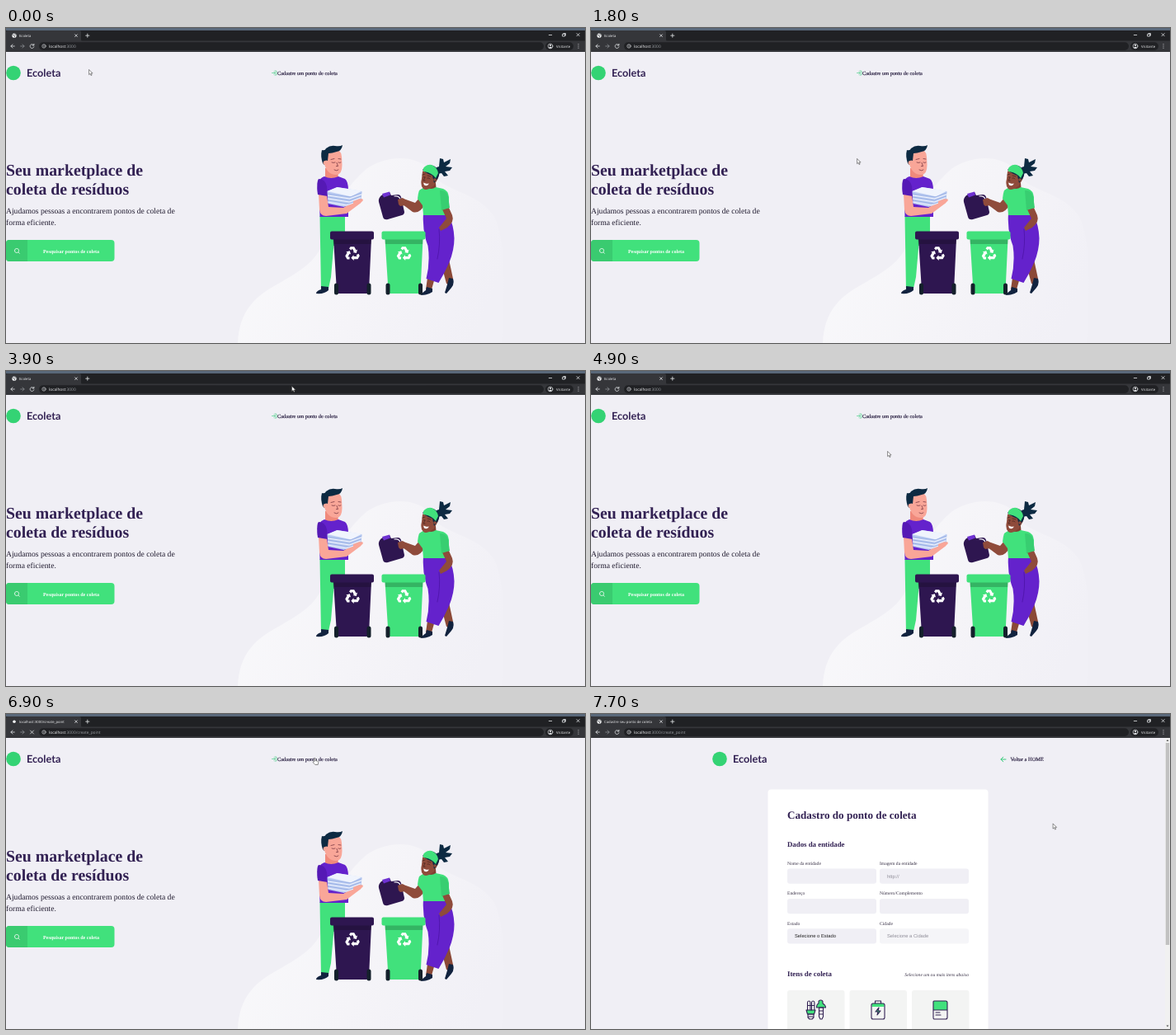
These frames come from a looping animation (702 px wide and 382 px high, 8 s). An HTML page:

```html
<!DOCTYPE html>
<html lang="pt-BR">
<head>
<meta charset="utf-8">
<title>Ecoleta</title>
<style>
html, body { margin: 0; width: 100%; height: 100%; overflow: hidden; background: #f0eff5; }
svg { display: block; }
text { text-rendering: geometricPrecision; font-family: "Liberation Serif", Times, serif; fill: #322153; }
.ui text { font-family: "Open Sans", "Noto Sans", sans-serif; fill: #f1f2f4; font-size: 4.25px; font-weight: 500; }
.ui .url { font-size: 4.85px; }
.ui .dim { fill: #989ca1; }
.brand { font: 700 12.7px Lato, "Noto Sans", sans-serif; }
.line { fill: none; stroke-linecap: round; stroke-linejoin: round; }
.h { font-weight: 700; }
.lead { fill: #1f1a2e; }
.link { font-size: 6.4px; fill: #1f1538; stroke: #1f1538; stroke-width: .15px; }
.label { font-size: 5.63px; fill: #3a3348; }
.field { font: 5.8px "Liberation Sans", Arial, sans-serif; fill: #222; }
.off { fill: #8f8d98; }
</style>
</head>
<body>
<svg width="702" height="382" viewBox="0 0 702 382">
  <defs>
    <linearGradient id="fade" x1="0" y1=".3" x2="1" y2=".6">
      <stop offset="0" stop-color="#f9f9fb"/>
      <stop offset=".55" stop-color="#f5f4f8"/>
      <stop offset="1" stop-color="#f1f0f6"/>
    </linearGradient>
    <path id="arm" d="M-3.6-5.8L-2.2-8H2L4.2-4.2 5.5-5 4.4-.8 .4-1.8 1.7-2.6-.2-5.8-1.2-4.2Z"/>
    <g id="cycle">
      <use href="#arm"/><use href="#arm" transform="rotate(120)"/><use href="#arm" transform="rotate(240)"/>
    </g>
    <g id="logo">
      <circle cx="9" cy="54.5" r="8.8" fill="#34d374"/>
      <text class="brand" x="25" y="59">Ecoleta</text>
    </g>
    <g id="bin">
      <path d="M4 9h46l-3 64q0 3-3 3H11q-3 0-3-3z"/>
      <path d="M4 10h46l-.3 6H4.300z" fill="#000" opacity=".2"/>
      <path d="M2 .5h49q2 0 2 2v6q0 2-2 2H2q-2 0-2-2v-6q0-2 2-2z"/>
      <g fill="#14202b">
        <rect x="5" y="63.500" width="5" height="14" rx="2.500"/>
        <rect x="44.500" y="63.500" width="5" height="14" rx="2.500"/>
      </g>
      <use href="#cycle" transform="translate(27 28) scale(1.100)" fill="#fff"/>
    </g>
  </defs>

  <g id="home">
    <path fill="url(#fade)" d="M281 382C283 344 300 326 332 309C362 292 380 280 388 250C394 222 414 190 438 170C466 152 504 154 519 178C530 198 570 198 590 226C604 246 606 300 601 382Z"/>
    <use href="#logo"/>
    <path class="line" stroke="#34cb79" stroke-width=".6" d="M322.500 54.500h3.700M324.800 53l1.500 1.500-1.500 1.500M325.800 52h2v5h-2"/>
    <text class="link" x="329" y="56.500">Cadastre um ponto de coleta</text>
    <g class="h" font-size="19.8">
      <text x="0" y="179">Seu marketplace de</text>
      <text x="0" y="202">coleta de resíduos</text>
    </g>
    <g font-size="9.62">
      <text class="lead" x="0" y="225">Ajudamos pessoas a encontrarem pontos de coleta de</text>
      <text class="lead" x="0" y="239">forma eficiente.</text>
    </g>
    <rect y="257" width="131.500" height="26" rx="4" fill="#41e17c"/>
    <path d="M26 257H4q-4 0-4 4v18q0 4 4 4h22z" fill="#3acb70"/>
    <path class="line" stroke="#fff" stroke-width=".7" d="M15.200 272.200l1.200 1.200M10.400 270a2.600 2.600 0 1 0 5.200 0a2.600 2.600 0 1 0-5.200 0"/>
    <text class="h" x="45" y="272.600" font-size="6.05" style="fill:#fff">Pesquisar pontos de coleta</text>

    <g id="man">
      <path d="M380.500 228H411v24l-13 4-4 46-3.500 16h-8.500z" fill="#41e17c"/>
      <path d="M396 256l15-6v14h-14z" fill="#36c96d"/>
      <path d="M382 313l9 1v4q-5 5-15 4 0-3 6-5z" fill="#12233f"/>
      <path d="M387 170h15l1 13q-7 7-16 0z" fill="#f08a7c"/>
      <path d="M386 153q0-6 10-6 11 0 11 9l.5 10q0 12-7 12-11 0-14.500-13z" fill="#f9a698"/>
      <path d="M384 164q-3-9-1-16 4 1 5-2 5-4 11-3 6 1 9-1-1 7-7 8-6 2-10 2l-1 9q-4-2-4 5z" fill="#0d2a42"/>
      <circle cx="387" cy="163.500" r="2.400" fill="#f9a698"/>
      <path class="line" stroke="#6b2c3a" stroke-width=".7" d="M395 163q2 1 4 0M403 163q1.500 1 3 0M394 159.500l4-1M403 158.500l3 .5M401 163.500l1.500 4h-2M398 172q3 2 5 0"/>
      <path d="M386 180q8 4 17 0l8 3q4 3 4 14v32h-34.500l-.5-26-2-2q-2-18 8-21z" fill="#6422cc"/>
      <path d="M379 201l10 2 2 14 18 1 14-9 6-3 4 2-4 5-16 12-25 3q-7 0-8-8z" fill="#f9a698"/>
      <path d="M379 183q8 0 10 9l1 12-12-2q-2-16 1-19z" fill="#5519b5"/>
      <path d="M389.500 198l12-5 30 5-1 11-21 8-19-4z" fill="#bccdf2"/>
      <path d="M389.500 198l12-5 30 4.500-13 7z" fill="#f0f4fd"/>
      <path class="line" stroke="#eef2fc" stroke-width="1.200" d="M390.500 203l26 4 14-5M390.500 207l26 4 13-5M390.500 211l22 4 17-6"/>
      <path class="line" stroke="#87a0dc" stroke-width=".6" d="M390 201l27 4 14-5M390.500 205l26 4 14-5M390.500 209l25 4 15-5"/>
      <path d="M421 210l8-3 4 2-4 4-8 1z" fill="#f9a698"/>
    </g>

    <g id="woman">
      <path d="M511 303h9l-4 14h-7zM526 280l10-4 6 28-3 8-5-2z" fill="#8b4937"/>
      <path d="M510 314l7 2v4q-5 4-14 4 0-2 6-6zM537 303l5 1q2 6-2 11l-6 7-2-1 3-10z" fill="#12233f"/>
      <path d="M506 225h30q7 14 7.500 30 0 14-6 29-6 14-13 25l-15-5q5-20 2-40-7-18-5.500-39z" fill="#6422cc"/>
      <path class="line" stroke="#4c14a6" stroke-width=".8" d="M525 244q2 18-2 36"/>
      <path d="M503 204l5 10q-7 12-15 9l-12-9-6-2 1-4 6-1 14 5z" fill="#8f4b3b"/>
      <path d="M508 184l13 4 1 12h-12z" fill="#7f3f31"/>
      <path d="M501 197q5-4 9-4 5 4 11 0l9 2q6 2 7 10v13l-2 9h-29l-1-12-6-8q1-8 2-10z" fill="#41e17c"/>
      <path d="M529 220l8-2 4 9q3 8-6 15l-8 4-2-4 9-11z" fill="#8f4b3b"/>
      <path d="M526 197q8-1 10 7l2 14-10 3z" fill="#38ce71"/>
      <path d="M523 177l-1-8 3-1 1-10 4 1 1 4 8-4-1 5-5 4 8 1-3 4-6 1 4 5-5 1-3-4z" fill="#0d2a42"/>
      <path d="M505 174q6-7 14-3 5 4 5 11l-5 9q-8 7-13 4-4-4-2-12z" fill="#8f4b3b"/>
      <path d="M508 169q9-6 16 3 3 6-1 11l-4 5-2-9q-7-2-12-7z" fill="#0d2a42"/>
      <path d="M506 170q4-5 10-4 7 3 8 10l-3 6q-5-7-15-8z" fill="#41e17c"/>
      <circle cx="520" cy="184" r="1.800" fill="#8f4b3b"/>
      <path class="line" stroke="#41211d" stroke-width=".7" d="M505 178l3-1M511 179l4 1M506 181q1-1 2 0M511 182q2-1 3 1M508 181l-2 4h2"/>
      <path d="M506 187.500q4 2 7 1-2 4-6 2z" fill="#fff"/>
      <path d="M455 203l10-4 2 4 8-1q3 0 4 3l4 18q0 3-3 4l-17 5q-5 1-6-3l-5-18q-1-4 3-8z" fill="#2e1650"/>
      <path d="M456 201l9-2.500 1 4-8 3z" fill="#6f32d2"/>
      <path class="line" stroke="#f3f2f7" stroke-width="1.200" d="M471 204q6-1 7 4l1 6"/>
      <path d="M475 208l6-2 5 4-2 5-6 1-2-2z" fill="#8f4b3b"/>
    </g>
    <use href="#bin" x="393" y="246" fill="#2e1650"/>
    <use href="#bin" x="455.500" y="246" fill="#41e17c"/>
  </g>

  <g id="form">
    <use href="#logo" x="147"/>
    <path class="line" stroke="#34cb79" stroke-width="1" d="M503 55h-6M499.700 52.200L497 55l2.700 2.800"/>
    <text class="link" x="508.500" y="57">Voltar a HOME</text>
    <rect x="214.500" y="91.500" width="267" height="300" rx="4" fill="#fff"/>
    <text class="h" x="238" y="127" font-size="13.14">Cadastro do ponto de coleta</text>
    <text class="h" x="238" y="161" font-size="8.82">Dados da entidade</text>
    <g id="fields"></g>
    <text class="h" x="238" y="318" font-size="8.82">Itens de coleta</text>
    <text class="label" x="458" y="317.500" text-anchor="end" font-style="italic">Selecione um ou mais itens abaixo</text>
    <g fill="#f3f4f3">
      <rect x="238" y="335" width="69.500" height="60" rx="3"/>
      <rect x="313.500" y="335" width="69.500" height="60" rx="3"/>
      <rect x="389" y="335" width="69.500" height="60" rx="3"/>
    </g>
    <g class="line" stroke="#322153" stroke-width="1.100">
      <path d="M261 359h11l-1.500 5h-8z" fill="#41e17c"/>
      <path d="M263 364h7v4l-2 2h-3l-2-2zM262.500 359v-9q0-2 1.700-2t1.700 2v9M267.500 359v-9q0-2 1.700-2t1.700 2v9M262.500 353.500h8.400M264 367h5"/>
      <path d="M273.500 356q0-4 2.500-5v-2q0-2 2.500-2t2.500 2v2q3.500 2 3.500 5z" fill="#41e17c"/>
      <path d="M276.500 356h5v11l-1.500 3h-2l-1.500-3zM276.500 360h5M276.500 364h5"/>
      <path d="M340.500 351h15v4h-15z" fill="#41e17c" stroke="none"/>
      <path d="M342 351h12q2 0 2 2v15q0 2-2 2h-12q-2 0-2-2v-15q0-2 2-2zM344.500 351v-3h7v3"/>
      <path d="M349 356l-4 5h3l-1 4 4-5h-3z" fill="#41e17c"/>
      <path d="M415 348h17v11h-17z" fill="#41e17c" stroke="none"/>
      <path d="M416 348h14q2 0 2 2v18q0 2-2 2h-14q-1 0-1-2v-19q0-1 1-1zM415 359h17M418 362h5M418 365h6"/>
    </g>
    <path fill="#f1f1f1" d="M696 29h6v353h-6z"/>
    <path fill="#c1c1c1" d="M696.800 35h4.400v245h-4.400z"/>
    <path fill="#555" d="M697.500 33l1.500-2 1.500 2zM697.500 377.500h3l-1.500 2z"/>
  </g>

  <g class="ui">
    <path fill="#202124" d="M0 0h702v16H0z"/>
    <path fill="#59687a" d="M0 0h702v3H0z"/>
    <path fill="#35363a" d="M0 15.500h702V29H0zM0 5q0-2 2-2h87q2 0 2 2v9q0 2 2 2H0z"/>
    <rect x="40" y="17.300" width="612" height="9.600" rx="4.800" fill="#202124"/>
    <rect x="654" y="17.300" width="34" height="9.600" rx="4.800" fill="#202124"/>
    <g id="globe">
      <circle cx="10" cy="9.200" r="2.600" fill="#f4f5f6"/>
      <path class="line" stroke="#35363a" stroke-width=".7" d="M8.200 8.200l2 .8.200 1.800M10.500 7.200l1.200 1"/>
    </g>
    <circle id="busy" cx="10" cy="9.200" r="1.800" fill="#f4f5f6"/>
    <text id="tab" x="16" y="10.800"></text>
    <g class="line" stroke="#e4e6e9" stroke-width=".8">
      <path d="M83.600 7.800l2.800 2.800M86.400 7.800l-2.800 2.800M96.700 9.200h4.200M98.800 7.100v4.200M658.300 8.500h3.400M675 7.400h2.600V10H675zM676 6.500h2.500V9M692 6.600l3.200 3.200M695.200 6.600L692 9.800"/>
      <path d="M10.300 22H6M8 19.900L5.900 22 8 24.100"/>
      <path stroke="#8b8e92" d="M17.700 22H22M20 19.900l2.100 2.100-2.100 2.100"/>
      <path id="reload" d="M33.600 20.800a2.400 2.400 0 1 0 .3 2M33.900 19.300v1.700h-1.700"/>
      <path id="stop" d="M29.500 20l4 4M33.500 20l-4 4"/>
      <circle cx="46" cy="22" r="2.200" stroke-width=".6"/>
      <path stroke-width=".6" d="M46 21.800v1.200M46 20.800v.1"/>
      <circle cx="660" cy="22" r="2.900" stroke-width=".7"/>
      <path stroke-width="1" d="M694 19.800v.01M694 22v.01M694 24.200v.01"/>
    </g>
    <path fill="#e4e6e9" d="M658.900 21a1.100 1.100 0 1 1 2.200 0a1.100 1.100 0 1 1-2.200 0M658 24q2-2.300 4 0-2 1.300-4 0z"/>
    <text class="url" x="52" y="23.700">localhost<tspan id="path" class="dim"></tspan></text>
    <text x="667" y="23.500">Visitante</text>
  </g>

  <g id="cursor" fill="#fff" stroke="#444" stroke-width=".6" stroke-linejoin="round">
    <path id="arrow" d="M-.4.4v6.200l1.500-1.300 1 2.300 1-.5-1-2.200h2z"/>
    <path id="hand" d="M2.200 5V1.200q0-.8.700-.8t.7.800V3.600l2.600.5q1 .2 1 1.200l-.5 3.200H3.300L.8 5.800q-.3-.9.500-1z"/>
  </g>
</svg>
<script>
const $ = id => document.getElementById(id);
const LOOP = 8000, TICK = 100;

// time, x, y
const moves = [
  [0, 101, 50],
  [100, 62, 10], [200, 24, 130], [300, 160, 240], [400, 330, 279], [500, 531, 245], [600, 506, 216],
  [800, 300, 178], [900, 114, 144],
  [1600, 22, 50], [1700, 461, 194], [1800, 323, 158],
  [2700, 314, 85],
  [3400, 430, 190], [3500, 681, 296], [3600, 460, 240], [3700, 130, 140], [3800, 260, 60],
  [3900, 347, 18], [4000, 352, 11], [4100, 340, 40],
  [4400, 180, 110], [4500, 1, 150], [4600, 200, 264], [4700, 340, 180], [4800, 300, 120],
  [4900, 360, 97], [5000, 530, 21], [5100, 673, 150], [5200, 477, 250],
  [5300, 445, 190], [5400, 405, 118], [5500, 380, 72], [5600, 371.5, 53],
  [7600, 515, 110], [7700, 560.5, 132.5]
];
const HAND = [5600, 7600];

// time, page, tab title, path, loading
const pages = [
  [0, "home", "Ecoleta", ":3000", false],
  [6800, "home", "localhost:3000/create_point", ":3000/create_point", true],
  [7000, "form", "Cadastre seu ponto de coleta", ":3000/create_point", false]
];

const fields = [
  ["Nome da entidade", ""], ["Imagem da entidade", "http://"],
  ["Endereço", ""], ["Número/Complemento", ""],
  ["Estado", "Selecione o Estado"], ["Cidade", "Selecione a Cidade"]
];
$("fields").innerHTML = fields.map(([label, value], i) => {
  const x = 238 + i % 2 * 112, y = 187.5 + (i >> 1) * 36.4;
  const last = i === 5;
  return `<text class="label" x="${x}" y="${y - 4.5}">${label}</text>
    <rect x="${x}" y="${y}" width="108" height="18.3" rx="3" fill="${last ? "#f5f5f8" : "#f0eff5"}"/>
    <text class="field ${i % 2 ? "off" : ""}" x="${x + 9}" y="${y + 11.1}">${value}</text>`;
}).join("");

const at = (table, t) => table.findLast(row => row[0] <= t);
const show = (id, on) => { $(id).style.display = on ? "" : "none"; };
const start = performance.now();

function draw() {
  const t = Math.floor((performance.now() - start) % LOOP / TICK) * TICK;
  const [, x, y] = at(moves, t);
  const [, page, title, path, loading] = at(pages, t);
  const hand = t >= HAND[0] && t < HAND[1];
  $("cursor").setAttribute("transform", `translate(${x} ${y})`);
  show("hand", hand);
  show("arrow", !hand);
  show("home", page === "home");
  show("form", page === "form");
  show("globe", !loading);
  show("reload", !loading);
  show("busy", loading);
  show("stop", loading);
  $("tab").textContent = title;
  $("path").textContent = path;
  requestAnimationFrame(draw);
}
draw();
</script>
</body>
</html>
```
